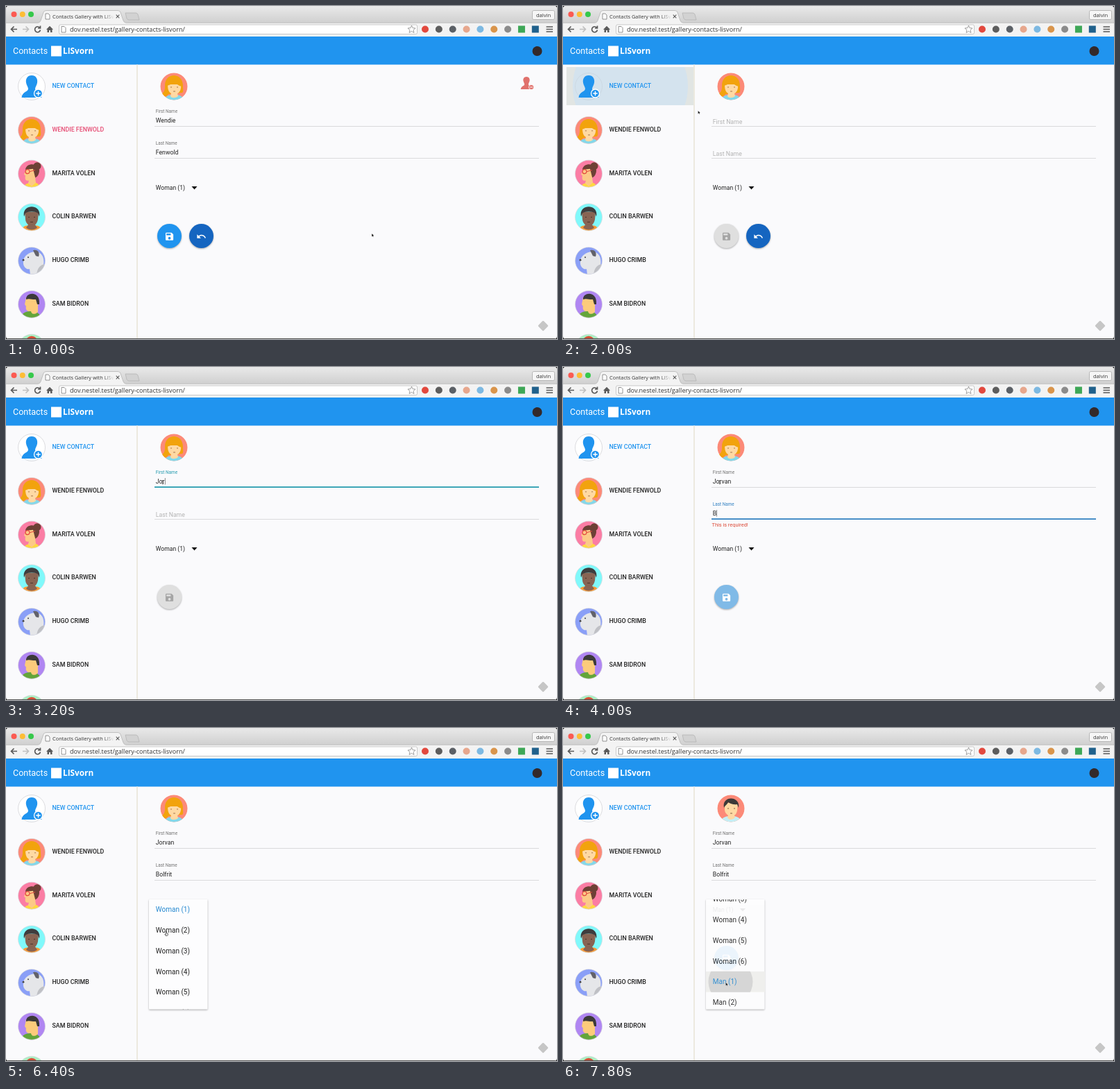
Recreate the animation shown at these times as an HTML page. Size 794x480 px, loop 8 s.

```html
<!DOCTYPE html>
<html lang="en">
<head>
<meta charset="utf-8">
<title>Contacts</title>
<style>
html, body { margin: 0; width: 100%; height: 100%; overflow: hidden; background: #111; }
svg { display: block; border-radius: 4px; font-family: Roboto, sans-serif; }
.chrome { font-family: "Open Sans", sans-serif; fill: #333; }
.raised { filter: drop-shadow(0 1.2px 1.3px rgba(0,0,0,.32)); }
.line { fill: none; stroke: #5a5a5a; stroke-width: 1.7; }
</style>
</head>
<body>
<svg width="794" height="480" viewBox="0 0 794 480">
<defs>
  <linearGradient id="bar" x2="0" y2="1"><stop stop-color="#e9e9e9"/><stop offset="1" stop-color="#cfcfcf"/></linearGradient>
  <linearGradient id="fade"><stop stop-color="#f3f3f3" stop-opacity="0"/><stop offset="1" stop-color="#f3f3f3"/></linearGradient>
  <clipPath id="disc"><circle r="19.5"/></clipPath>
  <clipPath id="tab"><path d="M60 6H155V24H60Z"/></clipPath>
  <clipPath id="cell"><path d="M5 88H189V143H5Z"/></clipPath>

  <path id="person" d="M0-16C6-16 9-11 8-5.5C7.5-2 5.5 0 5 3C5 8 13.5 7 14.5 16H-14.5C-13.5 7-5 8-5 3C-5.5 0-7.5-2-8-5.5C-9-11-6-16 0-16Z"/>
  <path id="save" d="M17 3H5c-1.1 0-2 .9-2 2v14c0 1.1.9 2 2 2h14c1.1 0 2-.9 2-2V7l-4-4zM12 19a3 3 0 1 1 0-6 3 3 0 0 1 0 6zM15 9H5V5h10z"/>
  <path id="undo" d="M12.5 8C9.8 8 7.4 9 5.6 10.6L2 7v9h9l-3.6-3.6c1.4-1.2 3.1-1.9 5.1-1.9 3.5 0 6.5 2.3 7.6 5.5l2.4-.8C21.1 11 17.1 8 12.5 8z"/>

  <g id="blonde" clip-path="url(#disc)">
    <circle r="20" fill="#fc8a78"/>
    <path fill="#f2a30d" d="M-13 0C-14-21 13-21 13-1C13 4 14 7 12 9L-8 11C-11 16-16 15-19 11C-14 9-13 5-13 0Z"/>
    <path fill="#83d8ea" d="M-14 20C-12 12-5 12 0 12S13 12 14 20Z"/>
    <path fill="#ffd9a3" d="M-9-3H10C11 4 8 9 5 10L6 14C2 17-3 17-5 14L-4 10C-8 8-9 3-9-3Z"/>
    <path fill="#f2a30d" d="M-10-1C-11-14 11-15 11 0C7-1 3-4 0-8C-2-4-6-2-10-1Z"/>
    <path stroke="#9b6a43" fill="none" d="M-5 1h2M4 1h2M-1 7h3" stroke-width=".9"/>
  </g>
  <g id="glasses" clip-path="url(#disc)">
    <circle r="20" fill="#fb7da4"/>
    <circle cx="8" cy="-11" r="5.5" fill="#6d4035"/>
    <path fill="#6d4035" d="M-9-6C-8-16 10-16 11-5C11 1 8 5 4 6L-2-4Z"/>
    <path fill="#fcc987" d="M-8-6L2-7L5 5L7 20H-7L-4 10C-9 11-10 8-9 3L-11 1Z"/>
    <path fill="#ffd93f" d="M-11 20C-10 15-7 14-5 14L0 18L6 13C9 14 11 16 11 20Z"/>
    <circle cx="-6" cy="-3" r="3" fill="none" stroke="#e2483f" stroke-width="1.2"/>
    <path d="M-3-3L5-5" stroke="#e2483f"/>
  </g>
  <g id="dark" clip-path="url(#disc)">
    <circle r="20" fill="#80f9fb"/>
    <path fill="#fa9a35" d="M-15 20C-13 11-6 12 0 12S13 11 15 20Z"/>
    <path fill="#886453" d="M-10-8H10L9 3C8 8 6 10 5 11L8 15C4 19-4 19-8 15L-5 11C-7 9-9 6-9 3Z"/>
    <path fill="#3e3d3e" d="M-11-1C-15-20 15-20 11-1L9-6C4-9-4-9-9-6Z"/>
    <path stroke="#4b352d" fill="none" d="M-5 0h2M3 0h2M-2 7h4"/>
  </g>
  <g id="pet" clip-path="url(#disc)">
    <circle r="20" fill="#8a9ff7"/>
    <path fill="#e5e6e9" d="M-12 1C-12-7-3-13 5-13C14-13 19-5 17 6L15 20H-2L-3 12C-8 13-13 8-12 1Z"/>
    <path fill="#62626a" d="M2-15C9-17 12-11 10-6L6-7Z"/>
    <path fill="#bfc0c5" d="M7 20C8 10 13 6 18 5V20Z"/>
    <circle cx="-12" cy="-1" r="1.4" fill="#444"/><circle cx="-5" cy="-5" r="1" fill="#444"/>
  </g>
  <g id="green" clip-path="url(#disc)">
    <circle r="20" fill="#b086f2"/>
    <path fill="#63a53a" d="M-16 20C-14 10-4 10 0 10S12 11 13 20Z"/>
    <path fill="#fccb7b" d="M-8-10H9V11C5 15 0 15-1 10C-8 11-9 6-8 3L-10 0Z"/>
    <path fill="#3b3a3a" d="M-8-7C-9-17 10-20 11-4V0H8L6-7C2-6-3-9-8-7Z"/>
  </g>
  <g id="mint" clip-path="url(#disc)">
    <circle r="20" fill="#acefc3"/><ellipse cy="-7" rx="9" ry="10" fill="#d64e35"/>
  </g>
  <g id="man" clip-path="url(#disc)">
    <circle r="20" fill="#fc8a78"/>
    <path fill="#c5eef4" d="M-15 20C-13 11-5 11 0 11S13 11 15 20Z"/>
    <path fill="#ffd9a3" d="M-9-8H10L9 3C8 8 6 9 5 10L6 13C2 17-3 17-5 13L-4 10C-7 8-9 5-9 2Z"/>
    <path fill="#3c3938" d="M-10-1C-14-19 14-19 11-1L9-6C4-5-1-7-4-9C-5-6-8-5-10-1Z"/>
    <path stroke="#76513b" fill="none" d="M-5 0h2M4 0h2M-1 7h3" stroke-width=".9"/>
  </g>
</defs>

<rect width="794" height="480" fill="#fafafc"/>

<g class="chrome">
  <rect width="794" height="25" fill="url(#bar)"/>
  <circle cx="11.5" cy="12" r="4" fill="#fb5a52"/><circle cx="23.8" cy="12" r="4" fill="#fdbd35"/><circle cx="36" cy="12" r="4" fill="#36c94b"/>
  <path d="M172 10H187Q189 10 190 12L192 20H177Q175 20 174 18Z" fill="#d2d2d2" stroke="#b0b0b0" stroke-width=".7"/>
  <rect y="24" width="794" height="20" fill="#f3f3f3"/>
  <path d="M0 24.3H46Q49 24 50 21L54 9Q55 6.5 58 6.5H161Q164 6.5 165 9L169 21Q170 24 173 24.3H794" fill="#f3f3f3" stroke="#b5b5b5" stroke-width=".8"/>
  <path d="M57 11H61L63 13V19H57Z" fill="#fff" stroke="#777" stroke-width=".8"/>
  <text x="67" y="17.5" font-size="7.4" clip-path="url(#tab)">Contacts Gallery with LISvorn</text>
  <rect x="140" y="8" width="16" height="14" fill="url(#fade)"/>
  <path class="line" stroke-width="1" d="M158.7 12.7l4.6 4.6M163.3 12.7l-4.6 4.6" style="stroke-width:1.1"/>
  <rect x="758.5" y="6.5" width="32" height="13" rx="2" fill="#f6f6f6" stroke="#aaa" stroke-width=".8"/>
  <text x="774.5" y="15.6" font-size="7.6" text-anchor="middle">dalvin</text>

  <path class="line" d="M16 33.5H7.5M11.5 29.5L7.5 33.5L11.5 37.5"/>
  <path class="line" d="M24 33.5H32.5M28.5 29.5L32.5 33.5L28.5 37.5" style="stroke:#c0c0c0"/>
  <path class="line" d="M48.5 31A4 4 0 1 0 49.5 34.5M49.5 28.5V32H46"/>
  <path d="M58 34L63 28.8L68 34H66.5V38H64V35H62V38H59.5V34Z" fill="#5a5a5a"/>
  <rect x="76.500" y="27" width="516" height="13.500" rx="2" fill="#fff" stroke="#bcbcbc" stroke-width=".8"/>
  <path d="M80 29.500H84L86 31.500V38H80Z" fill="#fff" stroke="#777" stroke-width=".8"/>
  <text x="92" y="36.800" font-size="9.100">dov.nestel.test/gallery-contacts-lisvorn/</text>
  <path d="M584.500 28L586 31.600L590 32L587 34.600L588 38.500L584.500 36.400L581 38.500L582 34.600L579 32L583 31.600Z" fill="#fff" stroke="#888" stroke-width=".8"/>
  <g id="addons"></g>
  <path class="line" d="M778.500 30H788M778.500 33.500H788M778.500 37H788"/>
</g>

<rect y="44" width="794" height="40.500" fill="#2094ef"/>
<g fill="#fff">
  <text x="10" y="69" font-size="12.500">Contacts</text>
  <rect x="65" y="57.500" width="15" height="15"/>
  <text x="82" y="69" font-size="11.800" font-weight="700" font-family="Open Sans, sans-serif">LISvorn</text>
</g>
<circle cx="765.500" cy="65" r="7" fill="#33292a"/>

<g id="cellTint" clip-path="url(#cell)"></g>
<g id="list"></g>
<rect x="188" y="84.500" width="2" height="396" fill="#ece9df"/>
<rect x="768.500" y="455.500" width="11" height="11" rx="1.500" fill="#c6c6c6" transform="rotate(45 774 461)"/>
<g id="live"></g>
<rect y="479" width="794" height="1" fill="#555"/>
</svg>

<script>
const LOOP = 8000, STEP = 200;
const BLUE = [32, 148, 239], GREY = [223, 223, 223];
const FIRST = "Jorvan", LAST = "Bolfrit";
const PEOPLE = [["WENDIE FENWOLD", "blonde"], ["MARITA VOLEN", "glasses"], ["COLIN BARWEN", "dark"],
  ["HUGO CRIMB", "pet"], ["SAM BIDRON", "green"], ["", "mint"]];
const CURSOR = [[0, 527, 328], [1000, 6, 90], [1200, 42, 112], [1400, 110, 128], [1800, 110, 128],
  [2000, 194.5, 151], [2200, 212, 160], [2400, 226, 166], [5000, 226, 166], [5200, 201.5, 278],
  [5400, 222, 270], [5600, 240, 262], [6000, 240, 262], [6200, 225, 273], [6400, 231, 293.5],
  [7000, 231, 293.5], [7200, 235, 345], [7400, 234.5, 367]];
const $ = id => document.getElementById(id);

// Linear interpolation through [time, ...values] keys
function at(t, keys) {
  const i = keys.findIndex(k => k[0] > t);
  if (i === 0) return keys[0].slice(1);
  if (i < 0) return keys[keys.length - 1].slice(1);
  const a = keys[i - 1], b = keys[i], k = (t - a[0]) / (b[0] - a[0]);
  return a.slice(1).map((v, j) => v + (b[j + 1] - v) * k);
}
const num = (t, ...keys) => at(t, keys)[0];
const mix = (a, b, k) => `rgb(${a.map((v, i) => Math.round(v + (b[i] - v) * k))})`;
const text = (x, y, size, fill, str, extra = "") =>
  `<text x="${x}" y="${y}" font-size="${size}" fill="${fill}" ${extra}>${str}</text>`;
const use = (id, x, y, s = 1, extra = "") =>
  `<use href="#${id}" transform="translate(${x} ${y}) scale(${s})" ${extra}/>`;

function list(selected) {
  const name = (y, fill, str) => text(66.5, y, 8.8, fill, str, 'font-weight="500"');
  let out = use("person", 37, 116, 1, 'fill="#2094ef"') +
    `<circle cx="46.500" cy="126" r="6" fill="#2094ef" stroke="#fff" stroke-width="1.300"/>
     <path d="M43.300 126H49.700M46.500 122.800V129.200" stroke="#fff" stroke-width="1.400"/>` +
    name(118.2, "#2094ef", "NEW CONTACT");
  PEOPLE.forEach(([str, face], i) => {
    const y = 178.9 + i * 62.75;
    out += use(face, 37, y) + `<circle cx="37" cy="${y}" r="19.500" fill="none" stroke="#d9d9dd" stroke-width=".7"/>` +
      name(y + 2, i === 0 && selected ? "#e64a72" : "#212121", str);
  });
  return out;
}

function cellTint(t) {
  const alpha = num(t, [2000, 1], [2400, 0]) * (t >= 1800);
  return `<circle cx="37" cy="116" r="19.500" fill="#fff" stroke="#dcdcdf"/>
    <g opacity="${alpha}"><path d="M5 88H189V143H5Z" fill="#e1e5e3"/>
    <circle cx="97" cy="116" r="${num(t, [1800, 42], [2000, 83], [2200, 110])}" fill="#d4e3ee"/>
    <circle cx="37" cy="116" r="19.500" fill="none" stroke="#c9d5de" stroke-width=".7"/></g>`;
}

function field(y, label, value, focus, grow, tint, caret) {
  const up = value || focus;
  let out = `<path d="M214 ${y}H768" stroke="#dadadc"/>` +
    (up ? text(215.8, y - 19.5, 6.4, focus ? tint : "#737373", label)
        : text(215.8, y - 4, 8.7, "#b4b4b4", label));
  if (focus) out += `<path d="M${491 - 277 * grow} ${y - .3}H${491 + 277 * grow}" stroke="${tint}" stroke-width="1.700"/>`;
  return out + text(215.8, y - 6, 8.7, "#222",
    value + (caret ? '<tspan font-size="10.500" font-weight="300" dx="-.6">|</tspan>' : ""));
}

function buttons(t) {
  const k = num(t, [1600, 1], [2000, 0], [3800, 0], [4200, 1]);
  const undo = num(t, [2000, 1], [2400, 0]);
  const round = (x, fill, id, ink) =>
    `<circle class="raised" cx="${x}" cy="331.500" r="17.500" fill="${fill}"/>` + use(id, x - 7.4, 324.8, .62, `fill="${ink}"`);
  return round(235.5, mix(GREY, BLUE, k), "save", mix([165, 165, 165], [255, 255, 255], Math.min(1, 2 * k))) +
    `<g opacity="${undo}">${round(281.5, "#1565c0", "undo", "#fff")}</g>`;
}

function menu(t, picked) {
  const open = num(t, [5600, 0], [6200, 1]);
  if (!open) return "";
  const scroll = num(t, [6600, 0], [6800, 74.5]);
  let rows = "";
  for (let i = 0; i < 9; i++) {
    const y = 261.5 + i * 29.8 - scroll;
    const label = i < 6 ? `Woman (${i + 1})` : `Man (${i - 5})`;
    if (i === 6 && t >= 7400) rows += `<clipPath id="row"><path d="M206 ${y - 15}h85v30h-85z"/></clipPath>
      <g clip-path="url(#row)"><path d="M206 ${y - 15}h85v30h-85z" fill="#efefec"/>
      <circle cx="241.500" cy="${y}" r="${num(t, [7400, 12], [7800, 32])}" fill="#d4d4d3"/></g>`;
    rows += text(215.8, y + 3.6, 10, i === (picked ? 6 : 0) ? "#2387cf" : "#212121", label);
  }
  const h = 158.5 * open;
  return `<g opacity="${open * num(t, [7600, 1], [7800, .92])}">
    <clipPath id="sheet"><rect x="206" y="247" width="85" height="${h}"/></clipPath>
    <rect class="raised" x="206" y="247" width="84.500" height="${h}" rx="1" fill="#fdfdfe"/>
    <g clip-path="url(#sheet)">${rows}</g></g>`;
}

function cursor(t) {
  let [x, y] = at(t, CURSOR);
  let shape = '<path d="M0 0V4.600L1.200 3.600L2 5L2.700 4.600L2 3.300L3.400 3Z" fill="#111" stroke="#fff" stroke-width=".3"/>';
  if (t < 1000) {
    const k = t / 1000, e = k * k * (3 - 2 * k);
    x = 527 - 521 * e;
    y = 328 - 238 * e;
  } else if (t >= 2400 && t <= 5000)
    shape = '<path d="M-1.200-2.500H1.200M0-2.500V2.500M-1.200 2.500H1.200" stroke="#555" stroke-width=".8"/>';
  else if (t >= 6400 && t <= 7000)
    shape = '<path d="M-.8 0H.4V2L2.300 2.500V5L1.500 6H-1L-2.200 3.500L-.8 4Z" fill="#ddd" stroke="#444" stroke-width=".7"/>';
  return `<g transform="translate(${x} ${y})">${shape}</g>`;
}

function live(t) {
  const start = t < 1800, picked = t >= 7600;
  const typed = (str, from, to) => str.slice(0, Math.floor(num(t, [from, 0], [to, str.length])));
  const onFirst = t >= 2400 && t < 3800, onLast = t >= 3800 && t < 5600;
  const x = picked ? 259 : 271.5;
  let out = use(picked ? "man" : "blonde", 242, 116) +
    field(173.5, "First Name", start ? "Wendie" : typed(FIRST, 2600, 3600), onFirst,
      num(t, [2200, 0], [2600, 1]), "#239aae", onFirst) +
    field(219.5, "Last Name", start ? "Fenwold" : typed(LAST, 3800, 4800), onLast,
      num(t, [3600, 0], [4000, 1]), "#2f7fc1", onLast && t < 4800) +
    text(215.8, 264.6, 8.6, "#212121", picked ? "Man (1)" : "Woman (1)") +
    `<path d="M${x - 4} 260h8l-4 4.500z" fill="#111"/>` + buttons(t);
  if (start) out += use("person", 750, 111, .57, 'fill="#e0716c"') +
    `<circle cx="757" cy="117" r="3.600" fill="#e0716c" stroke="#fff" stroke-width=".8"/><path d="M755 117h4" stroke="#fff"/>`;
  if (t === 3800 || t === 4000) out += text(214.5, 229.5, 7.4, "#dc4a38", "This is required!");
  return out + menu(t, picked) + cursor(t);
}

$("addons").innerHTML = ["#e2493e", "#5d5d5d", "#5b6066", "#e7a78d", "#7db9e2", "#d9954c", "#8b8b8b", "#3ea757", "#20618c"]
  .map((fill, i) => `<rect x="${599 + i * 19.85}" y="28.500" width="10" height="10" rx="${i < 7 ? 5 : 0}" fill="${fill}"/>`).join("");

let shown = -1;
function tick() {
  const t = Math.floor(performance.now() % LOOP / STEP) * STEP;
  if (t !== shown) {
    shown = t;
    $("cellTint").innerHTML = cellTint(t);
    $("list").innerHTML = list(t < 1800);
    $("live").innerHTML = live(t);
  }
  requestAnimationFrame(tick);
}
tick();
</script>
</body>
</html>
```
